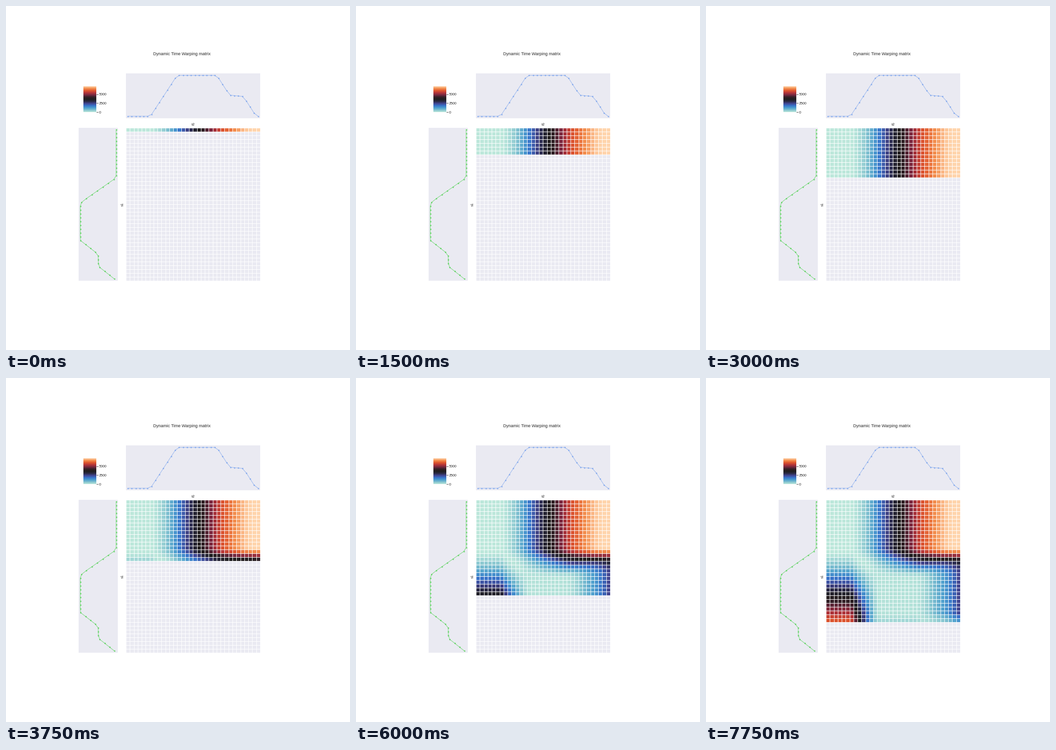
Animation, 720 px wide and 720 px high, one loop 8000 ms. Source, as a matplotlib script:

```python
import numpy as np
import matplotlib.pyplot as plt
from matplotlib.animation import FuncAnimation
from matplotlib.colors import LinearSegmentedColormap
from matplotlib.patches import Rectangle

SIZE, DPI = 720, 72
ROWS, COLS = 40, 34
PANEL, INK = "#eaeaf2", "#262626"
LEFT, RIGHT, TOP, BOTTOM = 251, 531.8, 254.8, 575.2
MAX_COST = 7220

plt.rcParams["font.family"] = "Liberation Sans"

# Dark-centred diverging map, ice blue to fire orange, evenly spaced
cmap = LinearSegmentedColormap.from_list("icefire", [
    "#bde7db", "#80c1cf", "#4b9dce", "#3873c9", "#434693", "#2a2943", "#1f1e1e",
    "#352028", "#772840", "#b53539", "#df562e", "#f38e4d", "#ffd4ac"])


def signal(n, *keys):
    """Piecewise linear signal of n samples through (index, level) keys."""
    return np.interp(np.arange(n), *zip(*keys))


def dtw(a, b):
    d = np.full((len(a) + 1, len(b) + 1), np.inf)
    d[0, 0] = 0
    for i, x in enumerate(a):
        for j, y in enumerate(b):
            d[i + 1, j + 1] = abs(x - y) + min(d[i, j], d[i, j + 1], d[i + 1, j])
    return d[1:, 1:]


s1 = signal(ROWS, (12, 0), (13, .065), (18, .83), (19, .965), (20, 1), (28, 1),
            (29, .99), (32, .58), (33, .5), (35, .495), (36, .455), (39, .05))
s2 = signal(COLS, (5, 0), (6, .045), (12, .93), (13, 1), (22, 1), (23, .93),
            (25, .63), (26, .515), (29, .485), (30, .375), (32, .075), (33, 0))
cost = dtw(s1, s2)
cost *= MAX_COST / cost.max()

fig = plt.figure(figsize=(SIZE / DPI, SIZE / DPI), dpi=DPI, facecolor="white")
ax = fig.add_axes([0, 0, 1, 1])
ax.axis("off")


def panel(x0, y0, x1, y1):
    ax.add_patch(Rectangle((x0, y0), x1 - x0, y1 - y0, fc=PANEL, lw=0, zorder=0))


def label(x, y, text, size=7.3, **kw):
    kw = {"ha": "center", "va": "center", **kw}
    ax.text(x, y, text, size=size, color=INK, **kw)


def series(x, y, color):
    ax.plot(x, y, "-o", color=color, alpha=0.55, lw=1.1, ms=3.2, mew=0)


def centers(edges):
    return (edges[:-1] + edges[1:]) / 2


x_edges = np.linspace(LEFT, RIGHT, COLS + 1)
y_edges = np.linspace(TOP, BOTTOM, ROWS + 1)

panel(251, 141, 532, 235)
panel(152, 255, 234, 575)
panel(251, 255, 532, 575)
series(centers(x_edges), 230.7 - 85.5 * s2, "cornflowerblue")
series(230.5 - 75 * s1, centers(y_edges), "limegreen")

label(368.5, 103, "Dynamic Time Warping matrix", size=9, va="baseline")
label(392, 248.3, "s2")
label(243.8, 415.5, "s1", rotation=90)

# Colour bar with ticks
ax.imshow(np.linspace(1, 0, 256)[:, None], cmap=cmap, aspect="auto",
          extent=(162, 189, 222, 168), interpolation="nearest")
for value in (0, 2500, 5000):
    y = 222 - 54 * value / MAX_COST
    ax.plot([189, 192.5], [y, y], color=INK, lw=0.8, solid_capstyle="butt")
    label(195, y + 0.3, str(value), ha="left", va="center_baseline")

mesh = ax.pcolormesh(
    x_edges, y_edges, np.ma.masked_all(cost.shape), cmap=cmap, vmin=0,
    vmax=MAX_COST, edgecolors="white", linewidth=1, antialiased=True, zorder=1)

ax.set_xlim(0, SIZE)
ax.set_ylim(SIZE, 0)


def update(frame):
    """Reveal one more matrix row per frame."""
    hidden = np.zeros(cost.shape, bool)
    hidden[frame + 1:] = True
    mesh.set_array(np.ma.array(cost, mask=hidden))
    return (mesh,)


anim = FuncAnimation(fig, update, frames=32, interval=250, repeat=True, blit=False)
plt.show()
```
